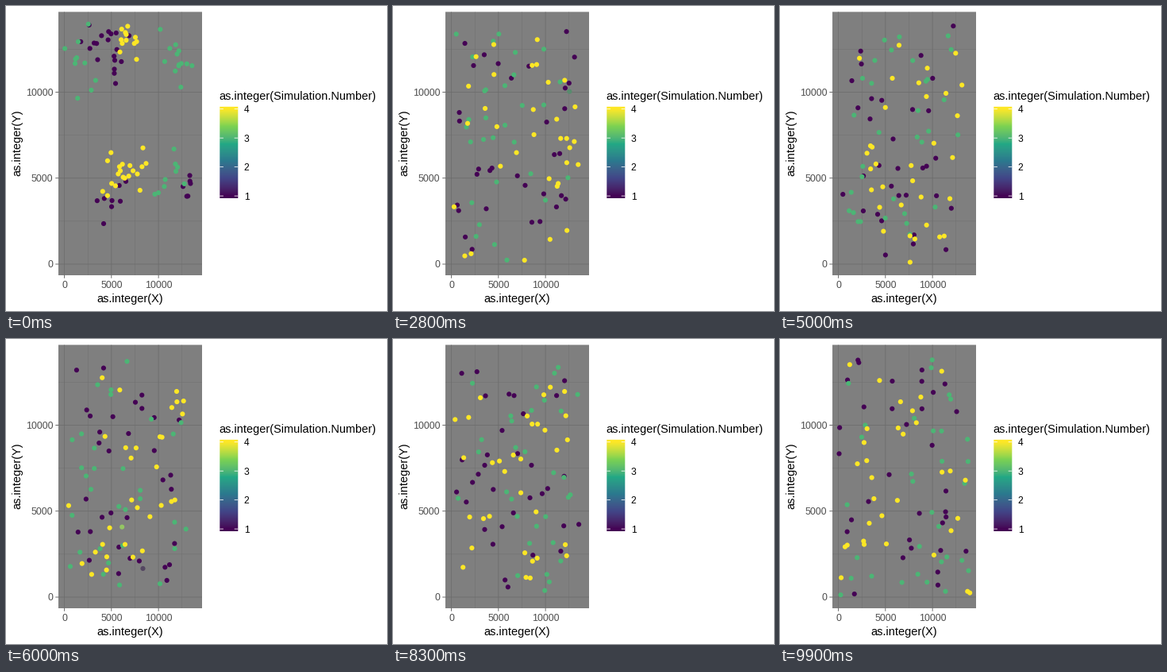
Recreate the animation shown at these times as a matplotlib script. Size 480 by 384 pixels, loop 10000 ms.

```python
import matplotlib.pyplot as plt
import numpy as np
from matplotlib.animation import FuncAnimation
from matplotlib.patches import Rectangle

W, H, DPI = 480, 384, 96
FRAMES, STATES = 100, 30
LEFT, RIGHT, TOP, BOTTOM = 66, 247, 7.4, 339
PX = 72 / DPI
plt.rcParams["font.family"] = "Liberation Sans"

M = np.array([[0.4124, 0.3576, 0.1805],
              [0.2126, 0.7152, 0.0722],
              [0.0193, 0.1192, 0.9505]])
WHITE = M.sum(axis=1)


def to_lab(rgb):
    lin = np.where(rgb > 0.04045, ((rgb + 0.055) / 1.055) ** 2.4, rgb / 12.92)
    q = lin @ M.T / WHITE
    f = np.where(q > 0.008856, np.cbrt(q), 7.787 * q + 16 / 116)
    x, y, z = f.T
    return np.stack([116 * y - 16, 500 * (x - y), 200 * (y - z)], axis=1)


def to_rgb(lab):
    y = (lab[:, 0] + 16) / 116
    f = np.stack([y + lab[:, 1] / 500, y, y - lab[:, 2] / 200], axis=1)
    q = np.where(f > 0.2069, f ** 3, (f - 16 / 116) / 7.787) * WHITE
    lin = np.clip(q @ np.linalg.inv(M).T, 0, 1)
    return np.where(lin > 0.0031308, 1.055 * lin ** (1 / 2.4) - 0.055, 12.92 * lin)


RAMP = ["#440154", "#414487", "#2A788E", "#22A884", "#7AD151", "#FDE725"]
STOPS = to_lab(np.array([[int(c[i:i + 2], 16) / 255 for i in (1, 3, 5)] for c in RAMP]))


def sim_lab(sim):
    """Lab colour of a simulation number from 1 to 4."""
    t = (np.asarray(sim, float) - 1) / 3
    grid = np.linspace(0, 1, len(STOPS))
    return np.stack([np.interp(t, grid, STOPS[:, i]) for i in range(3)], axis=1)


def px_x(v):
    return 73.6 + v * 0.01185


def px_y(v):
    return 325 - v * 0.02165


# Opening clusters: simulation, size, centre, spread (stage pixels)
CLUSTERS = [
    (1, 19, (137, 60), (17, 28)),
    (1, 8, (132, 244), (14, 15)),
    (1, 6, (230, 230), (12, 14)),
    (3, 10, (94, 75), (15, 27)),
    (3, 13, (218, 64), (14, 17)),
    (3, 9, (213, 220), (12, 20)),
    (4, 12, (152, 47), (10, 14)),
    (4, 20, (150, 215), (16, 25)),
]
LOW = np.array([px_x(0), 22])
SPAN = np.array([px_x(14000), 325]) - LOW


def reflect(u):
    return np.abs((u + 1) % 2 - 1)


def make_states(rng):
    """Random walk inside the field, with group sizes varying by a row."""
    xy = np.concatenate([rng.normal(c, s, (n, 2)) for _, n, c, s in CLUSTERS])
    u = reflect((xy - LOW) / SPAN)
    sims = np.repeat([c[0] for c in CLUSTERS], [c[1] for c in CLUSTERS])
    row = np.arange(len(u))
    states = [(LOW + u * SPAN, sim_lab(sims))]
    for _ in range(STATES - 1):
        u = reflect(u + rng.normal(0, 0.4, u.shape))
        a, b = 33 + rng.integers(-1, 2), 65 + rng.integers(-1, 2)
        sims = np.where(row < a, 1, np.where(row < b, 3, 4))
        states.append((LOW + u * SPAN, sim_lab(sims)))
    return states


states = make_states(np.random.default_rng(7))
times = np.round(np.linspace(0, FRAMES - 1, STATES))

fig = plt.figure(figsize=(W / DPI, H / DPI), dpi=DPI, facecolor="white")
ax = fig.add_axes([0, 0, 1, 1])
ax.axis("off")
ax.set_xlim(0, W)
ax.set_ylim(H, 0)


def line(x, y, color, width):
    ax.plot(x, y, color=color, lw=width * PX, solid_capstyle="butt", snap=False, zorder=2)


def label(x, y, s, size, color="black", ha="left", rot=0):
    ax.text(x, y, s, fontsize=size, color=color, ha=ha, va="baseline",
            rotation=rot, rotation_mode="anchor")


# Panel, grid and axes
ax.add_patch(Rectangle((LEFT, TOP), RIGHT - LEFT, BOTTOM - TOP, fc="#7F7F7F", lw=0,
                       snap=False, zorder=1))
for v in range(0, 12501, 2500):
    x, y = px_x(v), px_y(v)
    major = v % 5000 == 0
    width = 0.71 if major else 0.36
    line([x, x], [TOP, BOTTOM], "#6B6B6B", width)
    line([LEFT, RIGHT], [y, y], "#6B6B6B", width)
    if major:
        line([x, x], [BOTTOM, BOTTOM + 3.7], "#333333", 0.71)
        line([LEFT - 3.7, LEFT], [y, y], "#333333", 0.71)
        label(x, 355, str(v), 9.3, "#4D4D4D", "center")
        label(59.3, y + 4.3, str(v), 9.3, "#4D4D4D", "right")
label(156.5, 373, "as.integer(X)", 10.9, ha="center")
label(18.5, 172.3, "as.integer(Y)", 10.9, ha="center", rot=90)

# Colour bar, one stroke per pixel row
BAR_L, BAR_R, BAR_T, BAR_B = 269.3, 292.3, 126.8, 242
Y4, Y1 = BAR_T + 2.9, BAR_B - 2.9
edges = np.unique(np.r_[BAR_T, np.arange(np.ceil(BAR_T), BAR_B), BAR_B])
mid = (edges[:-1] + edges[1:]) / 2
ax.hlines(mid, BAR_L, BAR_R, colors=to_rgb(sim_lab(np.interp(mid, [Y4, Y1], [4, 1]))),
          linewidths=np.diff(edges) * PX, snap=False, zorder=1)
for v in range(1, 5):
    y = np.interp(v, [1, 4], [Y1, Y4])
    line([BAR_L, BAR_L + 4.6], [y, y], "white", 0.8)
    line([BAR_R - 4.6, BAR_R], [y, y], "white", 0.8)
    label(299.7, y + 4.5, str(v), 9)
label(268.6, 118, "as.integer(Simulation.Number)", 10.85)

dots = ax.scatter(*states[0][0].T, s=(6.15 * PX) ** 2, c=to_rgb(states[0][1]),
                  linewidths=0, zorder=5)
ax.set_xlim(0, W)
ax.set_ylim(H, 0)


def draw(frame):
    k = min(np.searchsorted(times, frame, side="right") - 1, STATES - 2)
    t = (frame - times[k]) / (times[k + 1] - times[k])
    (xy0, lab0), (xy1, lab1) = states[k], states[k + 1]
    dots.set_offsets(xy0 + (xy1 - xy0) * t)
    dots.set_facecolor(to_rgb(lab0 + (lab1 - lab0) * t))
    return dots,


anim = FuncAnimation(fig, draw, frames=FRAMES, interval=100, repeat=True, repeat_delay=0)
plt.show()
```
